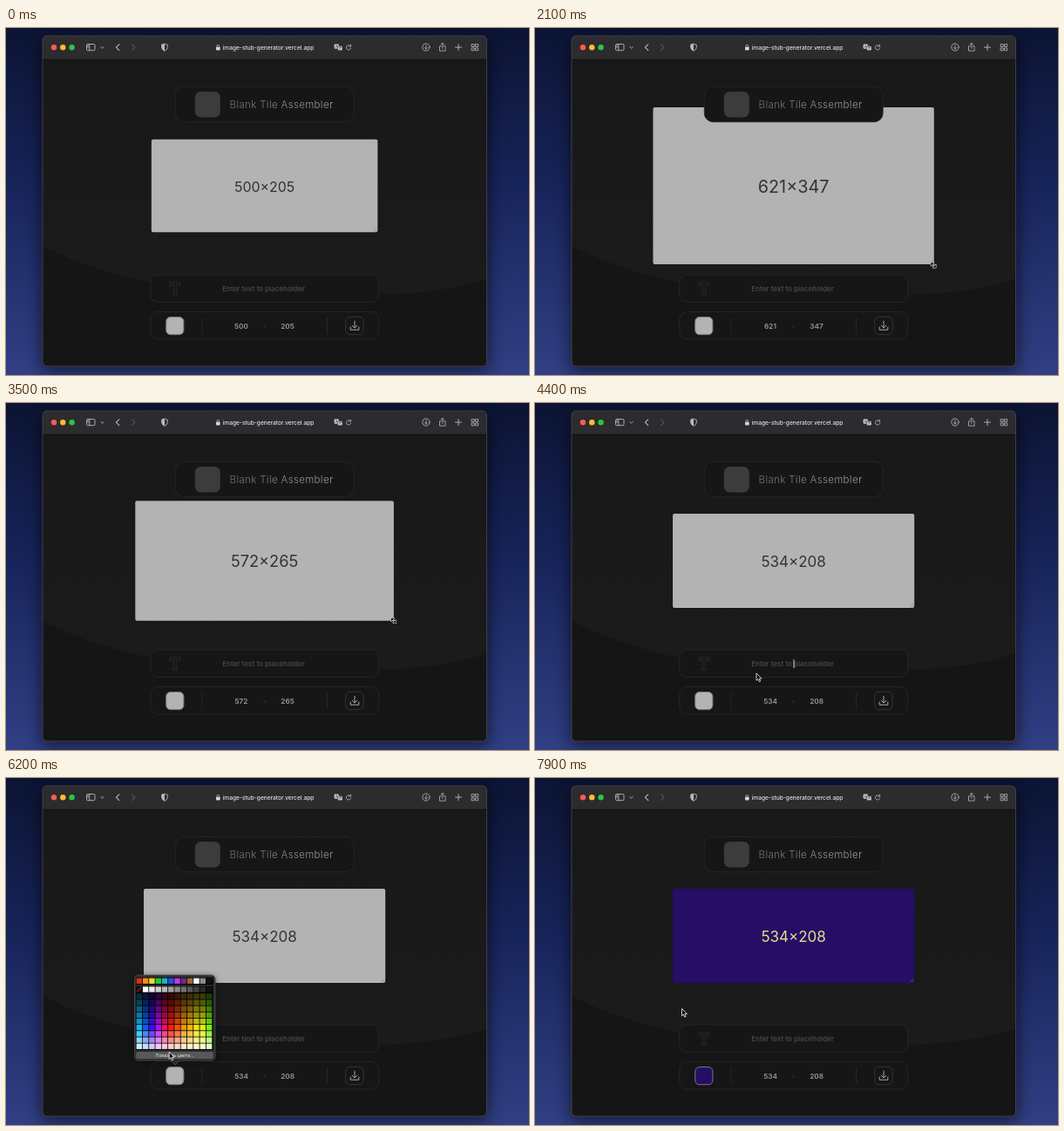
Write an HTML page that moves like this. It is 600 px wide and 398 px high and loops after 8000 ms.

```html
<!DOCTYPE html>
<html lang="en">
<head>
<meta charset="utf-8">
<title>Placeholder builder</title>
<style>
  html, body { margin: 0; width: 100%; height: 100%; overflow: hidden; background: #0d1534; }
  svg { display: block; width: 600px; height: 398px; }
  text { font-family: Inter, "Open Sans", sans-serif; text-anchor: middle; }
  .icon { fill: none; stroke: #b9b9bb; stroke-width: .9; stroke-linecap: round; stroke-linejoin: round; }
  .panel { fill: #161616; stroke: #252525; }
  .value { font-size: 8.2px; font-weight: 600; fill: #989898; }
</style>
</head>
<body>
<svg viewBox="0 0 600 398" xmlns="http://www.w3.org/2000/svg">
  <defs>
    <linearGradient id="sky" x2="0" y2="1">
      <stop offset="0" stop-color="#0c1433"/>
      <stop offset=".45" stop-color="#17245a"/>
      <stop offset="1" stop-color="#313f84"/>
    </linearGradient>
    <linearGradient id="page" x2="0" y2="1">
      <stop offset="0" stop-color="#181818"/>
      <stop offset="1" stop-color="#1b1b1b"/>
    </linearGradient>
    <linearGradient id="title" x2="1" y2="0">
      <stop offset="0" stop-color="#6c6c6c"/>
      <stop offset="1" stop-color="#a2a2a2"/>
    </linearGradient>
    <filter id="blur" x="-20%" y="-20%" width="140%" height="140%"><feGaussianBlur stdDeviation="9"/></filter>
    <filter id="soft" x="-20%" y="-20%" width="140%" height="140%"><feGaussianBlur stdDeviation="3"/></filter>
    <clipPath id="win"><rect x="42" y="9" width="509.5" height="379" rx="5"/></clipPath>
  </defs>

  <rect width="600" height="398" fill="url(#sky)"/>
  <rect x="40" y="14" width="514" height="380" rx="8" fill="#000" opacity=".55" filter="url(#blur)"/>

  <g clip-path="url(#win)">
    <rect x="42" y="9" width="510" height="380" fill="#151515"/>
    <path d="M42 36H552V287Q500 305 420 306Q180 320 42 250Z" fill="url(#page)"/>
    <rect x="42" y="9" width="510" height="27" fill="#2c2b2e"/>
    <path d="M42 36.2H552" stroke="#0e0e0e" stroke-width=".8"/>
  </g>
  <rect x="42" y="9" width="509.5" height="379" rx="5" fill="none" stroke="#4b4b50" stroke-width=".8"/>

  <circle cx="55" cy="22.2" r="3.2" fill="#fc5b57"/>
  <circle cx="65.3" cy="22.2" r="3.2" fill="#fdbc2e"/>
  <circle cx="75.6" cy="22.2" r="3.2" fill="#29c840"/>
  <g class="icon">
    <rect x="92.5" y="18.5" width="9.5" height="7.2" rx="1.3"/>
    <path d="M95.8 18.5v7.2M93.6 20.5h1M93.6 22.2h1"/>
    <path d="M108.8 21.6l1.7 1.6 1.7-1.6"/>
    <path d="M129.8 18.8l-3.4 3.4 3.4 3.4" stroke-width="1.1"/>
    <path d="M144.6 18.8l3.4 3.4-3.4 3.4" stroke="#56565a" stroke-width="1.1"/>
    <path d="M182 18.2l3.3 1.1v3q0 2.7-3.3 4-3.3-1.3-3.3-4v-3z"/>
    <path d="M182 18.2v8.1q-3.3-1.3-3.3-4v-3z" fill="#b9b9bb" stroke="none"/>
    <path d="M395.2 20.7a2.7 2.7 0 1 0 .5 2.4M395.6 19.2v1.9h-1.9" stroke-width=".8"/>
    <circle cx="482" cy="22" r="4.1" stroke-width=".8"/>
    <path d="M482 19.8v4.2M480.4 22.6l1.6 1.6 1.6-1.6" stroke-width=".8"/>
    <path d="M499.3 20.8h-1.8v5.4h6.6v-5.4h-1.8M500.8 23.4v-6M499 19l1.8-1.8 1.8 1.8" stroke-width=".8"/>
    <path d="M519 18.6v7M515.5 22.1h7"/>
    <path d="M534.4 18.6h2.8v2.8h-2.8zM538.9 18.6h2.8v2.8h-2.8zM534.4 23h2.8v2.8h-2.8zM538.9 23h2.8v2.8h-2.8z" stroke-width=".8"/>
  </g>
  <rect x="241" y="21.8" width="4.6" height="3.7" rx=".7" fill="#d8d8da"/>
  <path d="M242 22v-1.3a1.3 1.3 0 0 1 2.6 0V22" fill="none" stroke="#d8d8da" stroke-width=".7"/>
  <text x="301" y="24.9" font-size="6.6" font-weight="500" fill="#e2e2e4">image-stub-generator.vercel.app</text>
  <rect x="376.6" y="18.6" width="5.2" height="5.2" rx="1" fill="#d0d0d2"/>
  <rect x="380.4" y="20.8" width="5.6" height="5" rx="1" fill="#d0d0d2" stroke="#2c2b2e" stroke-width=".6"/>
  <path d="M378 22.6l1.3-2.8 1.2 2.8M381.8 22.3h2.8M382 24.6l2.2-2.2" stroke="#2c2b2e" stroke-width=".6" fill="none"/>

  <rect id="stub" rx="2"/>
  <text id="size"></text>
  <path id="grip" d="M-4.5-1l3.5-3.5M-2.2-.8l1.4-1.4" stroke="#777" stroke-width=".6"/>

  <rect class="panel" x="194.3" y="67.3" width="204.8" height="40.4" rx="10"/>
  <rect x="216.8" y="73" width="29" height="29.5" rx="6.5" fill="#3c3c3c"/>
  <text x="316" y="92" font-size="11.5" font-weight="300" letter-spacing=".35" fill="url(#title)">Blank Tile Assembler</text>

  <rect class="panel" x="165.8" y="283" width="261.8" height="31.5" rx="8.5"/>
  <path d="M187.8 291.8h12.2v3.6h-1.6l-.6-1.4h-2.4v10.2l1.4.6v1h-5.8v-1l1.4-.6V294h-2.4l-.6 1.4h-1.6z" fill="none" stroke="#2c2c2c" stroke-width=".9"/>
  <text x="295.5" y="301.9" font-size="8" font-weight="600" fill="#474747">Enter text to placeholder</text>
  <path id="caret" d="M297 294.2v9.8" stroke="#d8d8d8" stroke-width="1"/>

  <rect class="panel" x="165.8" y="325.5" width="261.8" height="31.5" rx="8.5"/>
  <path d="M224.8 332v19M368.5 332v19" stroke="#262626"/>
  <rect id="swatch" x="183.7" y="331.5" width="20.2" height="20.2" rx="5" stroke="#777"/>
  <text id="wide" class="value" x="270" y="344.5"></text>
  <text x="296.5" y="344" font-size="7" fill="#343434">×</text>
  <text id="high" class="value" x="323" y="344.5"></text>
  <rect x="389.7" y="331.3" width="20.4" height="20.4" rx="5" fill="none" stroke="#343434"/>
  <path d="M400 336.2v7.6M397.2 341.2l2.8 2.8 2.8-2.8M395.2 343v3.2h9.6V343" fill="none" stroke="#a8a8a8" stroke-linecap="round" stroke-linejoin="round"/>

  <g id="picker">
    <rect x="147" y="227" width="93" height="98" rx="5" fill="#000" opacity=".6" filter="url(#soft)"/>
    <path d="M152 226H235.5a4.5 4.5 0 0 1 4.5 4.5V319.500a4.500 4.500 0 0 1-4.500 4.500H199l-5 5.200-5-5.200H152a4.500 4.500 0 0 1-4.500-4.500V230.500a4.500 4.500 0 0 1 4.500-4.500z" fill="#2b2c2e" stroke="#55565a" stroke-width=".7"/>
    <rect x="149.200" y="229" width="88.300" height="8" fill="#000"/>
    <rect x="149.200" y="238.700" width="88.300" height="73.200" fill="#000"/>
    <g id="cells"></g>
    <rect x="149.300" y="313.900" width="88.400" height="8.200" rx="1.500" fill="#57585b"/>
    <text x="193.500" y="319.900" font-size="5.200" fill="#eee">Показать цвета...</text>
    <rect id="hover" width="8.600" height="8.400" rx="1" fill="none" stroke="#fff" stroke-width="1.800"/>
  </g>

  <g id="arrow"><path d="M0 0V8.300L1.900 6.600 3.200 9.600 4.600 9 3.300 6.100H5.900Z" fill="#000" stroke="#fff" stroke-width=".8" stroke-linejoin="round"/></g>
  <g id="sizer">
    <path d="M-2.600-2.600h3L-2.600.4zM2.600 2.600h-3L2.600-.4zM-2 -2L2 2" fill="#000" stroke="#fff" stroke-width="1.600" stroke-linejoin="round"/>
    <path d="M-2.600-2.600h3L-2.600.4zM2.600 2.600h-3L2.600-.4zM-2 -2L2 2" fill="#000" stroke="#000" stroke-width=".5"/>
  </g>
  <g id="beam" fill="none" stroke="#ddd" stroke-width=".8"><path d="M-1.500-5Q0-5 0-4V4Q0 5-1.500 5M1.500-5Q0-5 0-4V4Q0 5 1.500 5"/></g>
</svg>
<script>
const LOOP = 8000, STEP = 100, SCALE = .519, CX = 296.6, CY = 181;
const GRID = { x: 149.6, y: 247.2, w: 7.29, h: 7.17 };
const $ = id => document.getElementById(id);
const el = Object.fromEntries(
  ["stub", "size", "grip", "caret", "swatch", "wide", "high", "picker", "cells", "hover", "arrow", "sizer", "beam"]
    .map(id => [id, $(id)]));

// time, width, height, cursor offset from the corner
const sizes = [
  [0, 500, 205, 0, 0], [700, 500, 205, 0, 0], [900, 514, 221, 0, 0], [1300, 532, 238, 0, 0],
  [1800, 557, 258, 0, 0], [2100, 621, 347, -.7, 1], [2600, 664, 398, -2, 0], [3000, 677, 414, -3.6, -1.5],
  [3200, 660, 380, -1, 0], [3600, 542, 226, 0, 0], [3800, 534, 208, 0, 0], [LOOP, 534, 208, 0, 0]
];
// time, x, y
const path = [
  [3800, 435, 235], [4200, 298, 299], [4400, 254, 310], [4700, 246, 314], [5100, 193.3, 340.3],
  [6000, 193.3, 340.3], [6400, 181, 288], [6700, 173.500, 266], [6900, 172.500, 264.500], [7100, 168.500, 264.500], [LOOP, 168.500, 264.500]
];

function sample(keys, t) {
  if (t <= keys[0][0]) return keys[0].slice(1);
  const i = keys.findIndex(k => k[0] >= t);
  const a = keys[i - 1], b = keys[i], p = (t - a[0]) / (b[0] - a[0]);
  return a.slice(1).map((v, n) => v + (b[n + 1] - v) * p);
}
const ramp = (t, a, b) => Math.min(1, Math.max(0, (t - a) / (b - a)));
const mix = (a, b, p) => `rgb(${a.map((v, i) => Math.round(v + (b[i] - v) * p))})`;
const set = (node, attrs) => { for (const k in attrs) node.setAttribute(k, attrs[k]); };
const show = (node, on) => { node.style.display = on ? "" : "none"; };
const place = (node, x, y) => set(node, { transform: `translate(${x} ${y})` });

function cell(col, y, fill) {
  const r = document.createElementNS("http://www.w3.org/2000/svg", "rect");
  set(r, { x: GRID.x + col * GRID.w, y, width: GRID.w - .8, height: GRID.h - .8, fill });
  el.cells.append(r);
}

function buildPicker() {
  const basics = ["#d9301c", "#f0901f", "#f5d62c", "#2fc145", "#16b7c8", "#2450e8",
    "#c23be0", "#74288f", "#9b6a32", "#fff", "#8c8c8c", "#111"];
  const hues = [196, 219, 253, 284, 337, 4, 18, 35, 43, 56, 65, 92];
  const lights = [13, 19, 26, 33, 41, 50, 62, 75, 89];
  basics.forEach((c, i) => cell(i, 229.600, c));
  for (let i = 0; i < 12; i++) {
    cell(i, 239.300, i ? `hsl(0 0% ${Math.round(100 - (i - 1) * 9.300)}%)` : "#181010");
  }
  lights.forEach((l, row) => hues.forEach((h, col) => cell(col, GRID.y + row * GRID.h, `hsl(${h} 88% ${l}%)`)));
  const slash = document.createElementNS("http://www.w3.org/2000/svg", "path");
  set(slash, { d: "M150 245.300L155.700 239.700", stroke: "#d33", "stroke-width": .9 });
  el.cells.append(slash);
}

function drawStub(t, w, h) {
  const sw = w * SCALE, sh = h * SCALE, tint = ramp(t, 7200, 7500), font = sw * .0613;
  const label = [Math.round(w), Math.round(h)];
  const fill = mix([179, 179, 179], [38, 14, 102], tint);
  set(el.stub, { x: CX - sw / 2, y: CY - sh / 2, width: sw, height: sh, fill });
  set(el.size, { x: CX, y: CY + .8 + font * .364, "font-size": font, fill: mix([51, 51, 51], [226, 227, 140], tint) });
  set(el.swatch, { fill });
  el.size.textContent = label.join("×");
  el.wide.textContent = label[0];
  el.high.textContent = label[1];
  place(el.grip, CX + sw / 2, CY + sh / 2);
}

function drawPicker(t, x, y) {
  const alpha = ramp(t, 5300, 5500) * (1 - ramp(t, 7200, 7400));
  const col = Math.floor((x - GRID.x) / GRID.w), row = Math.floor((y - GRID.y) / GRID.h);
  show(el.picker, alpha > 0);
  el.picker.style.opacity = alpha;
  show(el.hover, row >= 0 && row < 9 && col >= 0);
  set(el.hover, { x: GRID.x + col * GRID.w - 1, y: GRID.y + row * GRID.h - 1 });
}

function render(t) {
  const [w, h, dx, dy] = sample(sizes, t), [x, y] = sample(path, t);
  const sizing = t >= 400 && t < 3900, typing = t >= 4100 && t < 4300;
  drawStub(t, w, h);
  drawPicker(t, x, y);
  show(el.caret, t >= 4200 && t < 4700);
  show(el.sizer, sizing);
  show(el.beam, typing);
  show(el.arrow, t >= 3900 && !typing);
  place(el.sizer, CX + w * SCALE / 2 + dx, CY + h * SCALE / 2 + dy);
  place(el.beam, x, y);
  place(el.arrow, x, y);
}

buildPicker();
const start = performance.now();
function tick() {
  const t = (performance.now() - start) % LOOP;
  render(Math.floor(t / STEP) * STEP);
  requestAnimationFrame(tick);
}
tick();
</script>
</body>
</html>
```
